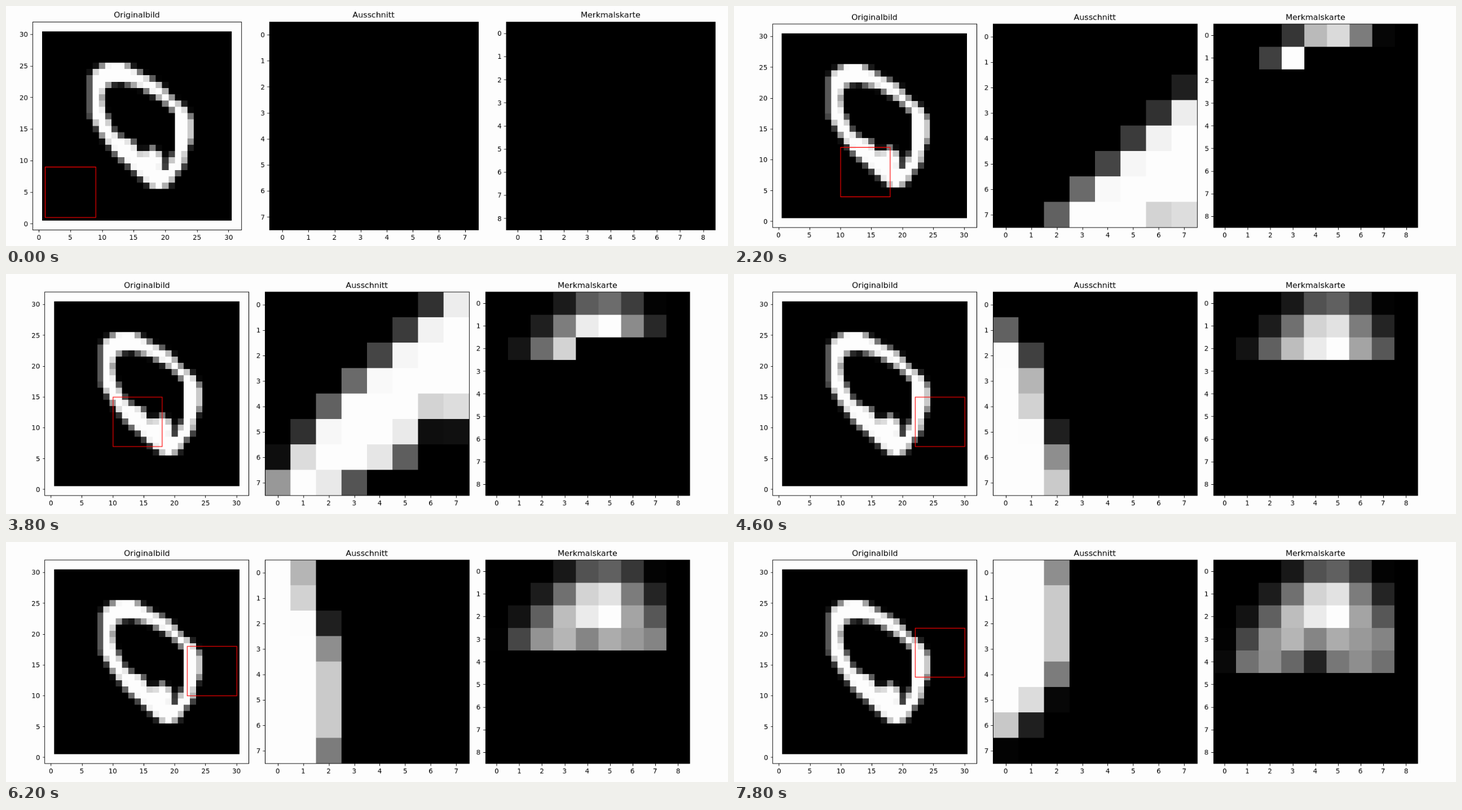
Recreate the animation shown at these times as an HTML page with a canvas. Size 1280 by 427 pixels, loop 8 s.

```html
<!DOCTYPE html>
<html lang="de">
<head>
<meta charset="utf-8">
<title>Merkmalskarte</title>
<style>
  html, body { margin: 0; width: 100%; height: 100%; overflow: hidden; background: #fdfdfd; }
  canvas { display: block; }
</style>
</head>
<body>
<canvas id="stage" width="1280" height="427"></canvas>
<script>
const WIDTH = 1500, HEIGHT = 500;    // the figure is drawn larger, then scaled to the stage
const STEP_MS = 200, STEPS = 40, PER_ROW = 8;
const SIZE = 30, WINDOW = 8, STRIDE = 3, MAP = 9;
const PAPER = '#fdfdfd', WHITE = 253;
const TICK = 4.86, LABEL_GAP = 9.72, TITLE_GAP = 8.33;

// The digit as an outer outline and a hole, in cells, y upwards.
const DIGIT = new Path2D(`
  M18.8 6 L17.4 7 14.2 10 13 11 10.7 14 9.5 16 8.66 17.6 8.66 24 9.5 25 11.3 26
  L13.9 26 15.6 25 17.3 24 19.2 23 20.4 22 21 21 22.2 20 23.6 19 24.2 18 24.8 17
  L24.8 14 23.9 12 23.66 10 22.9 9 21.9 8 21.6 7 20 6 Z
  M11 21.9 L12 22.8 13.2 23.1 15 22.5 16.7 22.05 20 20 22 18 22 12 20.95 10 20.7 8.9
  L19.8 9 20.3 10 20.1 11.3 18.8 12.5 18.1 12.6 17.4 11.7 16.4 11.7 15.3 13.7
  L14 14.1 12.5 15 11 18.3 10.6 20.5 Z`);

function newContext(width, height) {
  const canvas = document.createElement('canvas');
  canvas.width = width;
  canvas.height = height;
  return canvas.getContext('2d');
}

const screen2d = document.getElementById('stage').getContext('2d');
screen2d.imageSmoothingQuality = 'high';
const ctx = newContext(WIDTH, HEIGHT);

const range = (count, make) => Array.from({ length: count }, (_, i) => make(i));
const grid = (n, make) => range(n, row => range(n, col => make(col, row)));

// Each cell holds the share of its area that the outline covers.
function rasterize(path) {
  const side = SIZE + 1, small = newContext(side, side);
  small.fill(path, 'evenodd');
  const { data } = small.getImageData(0, 0, side, side);
  return grid(SIZE, (col, row) => data[((row + 1) * side + col + 1) * 4 + 3] / 255);
}

const digit = rasterize(DIGIT);

function normalized(cells) {
  const max = Math.max(...cells.flat()) || 1;
  return cells.map(row => row.map(v => v / max));
}

const corner = step => ({
  x: 1 + STRIDE * (step % PER_ROW),
  y: 1 + STRIDE * Math.floor(step / PER_ROW)
});

function cutout(step) {
  const { x, y } = corner(step);
  return grid(WINDOW, (col, row) => digit[y - 1 + row][x - 1 + col]);
}

const features = range(STEPS, step => cutout(step).flat().reduce((a, b) => a + b));

function featureMap(step) {
  return grid(MAP, (col, row) => {
    const index = row * PER_ROW + col;
    return col < PER_ROW && index <= step ? features[index] : 0;
  });
}

// The margins are refitted on every step and settle after a while.
function layout(step) {
  const pad = 15, labels = 27.7, between = 33.7;
  let left = pad + labels, gap = between, size = 433.6, top = 32.8;
  const slot = () => (WIDTH - pad - left - 2 * gap) / 3;
  const slack = () => (slot() - size) / 2;
  for (let i = 0; i < step; i++) {
    const s = slack();
    left = pad + Math.max(0, labels - s);
    gap = between - 2 * s;
    size = 423.9;
    top = 37.4;
  }
  return range(3, i => ({ x: left + slack() + i * (slot() + gap), y: top, size }));
}

function plot(box, low, span, upward) {
  const scale = box.size / span, bottom = box.y + box.size;
  return {
    ...box, bottom,
    px: v => box.x + (v - low) * scale,
    py: v => upward ? bottom - (v - low) * scale : box.y + (v - low) * scale
  };
}

const snap = v => Math.round(v) + 0.5;

function frameRect(x0, y0, x1, y1) {
  ctx.strokeRect(snap(x0), snap(y0), snap(x1) - snap(x0), snap(y1) - snap(y0));
}

// align: 0 left, 0.5 centre, 1 right
function drawText(text, x, baseline, align) {
  ctx.fillText(text, Math.round(x - align * ctx.measureText(text).width), Math.round(baseline));
}

function drawCells(p, cells, first) {
  cells.forEach((row, r) => row.forEach((value, c) => {
    const [x0, x1] = [c - 0.5, c + 0.5].map(v => Math.round(p.px(v + first)));
    const [y0, y1] = [r - 0.5, r + 0.5].map(v => Math.round(p.py(v + first)));
    const level = Math.round(WHITE * value);
    ctx.fillStyle = `rgb(${level},${level},${level})`;
    ctx.fillRect(x0, y0, x1 - x0, y1 - y0);
  }));
}

function drawAxes(p, title, last, every) {
  ctx.strokeStyle = ctx.fillStyle = '#000';
  ctx.lineWidth = 1.11;
  frameRect(p.x, p.y, p.x + p.size, p.bottom);

  ctx.font = '13.89px "DejaVu Sans", sans-serif';
  ctx.beginPath();
  for (let v = 0; v <= last; v += every) {
    const x = p.px(v), y = p.py(v);
    ctx.moveTo(snap(x), snap(p.bottom));
    ctx.lineTo(snap(x), snap(p.bottom + TICK));
    ctx.moveTo(snap(p.x), snap(y));
    ctx.lineTo(snap(p.x - TICK), snap(y));
    drawText(v, x, p.bottom + LABEL_GAP + 11, 0.5);
    drawText(v, p.x - LABEL_GAP, y + 5.3, 1);
  }
  ctx.stroke();

  ctx.font = '16.67px "DejaVu Sans", sans-serif';
  drawText(title, p.x + p.size / 2, p.y - TITLE_GAP, 0.5);
}

function draw(step) {
  ctx.fillStyle = PAPER;
  ctx.fillRect(0, 0, WIDTH, HEIGHT);
  const boxes = layout(step);

  const image = plot(boxes[0], -1, 33, true);
  drawCells(image, digit, 1);
  const { x, y } = corner(step);
  ctx.strokeStyle = '#f00';
  ctx.lineWidth = 1.39;
  frameRect(image.px(x), image.py(y + WINDOW), image.px(x + WINDOW), image.py(y));
  drawAxes(image, 'Originalbild', SIZE, 5);

  const detail = plot(boxes[1], -0.5, WINDOW, false);
  drawCells(detail, normalized(cutout(step)), 0);
  drawAxes(detail, 'Ausschnitt', WINDOW - 1, 1);

  const map = plot(boxes[2], -0.5, MAP, false);
  drawCells(map, normalized(featureMap(step)), 0);
  drawAxes(map, 'Merkmalskarte', MAP - 1, 1);

  screen2d.drawImage(ctx.canvas, 0, 0, 1280, 427);
}

function tick() {
  draw(Math.floor(performance.now() / STEP_MS) % STEPS);
  requestAnimationFrame(tick);
}
tick();
</script>
</body>
</html>
```
